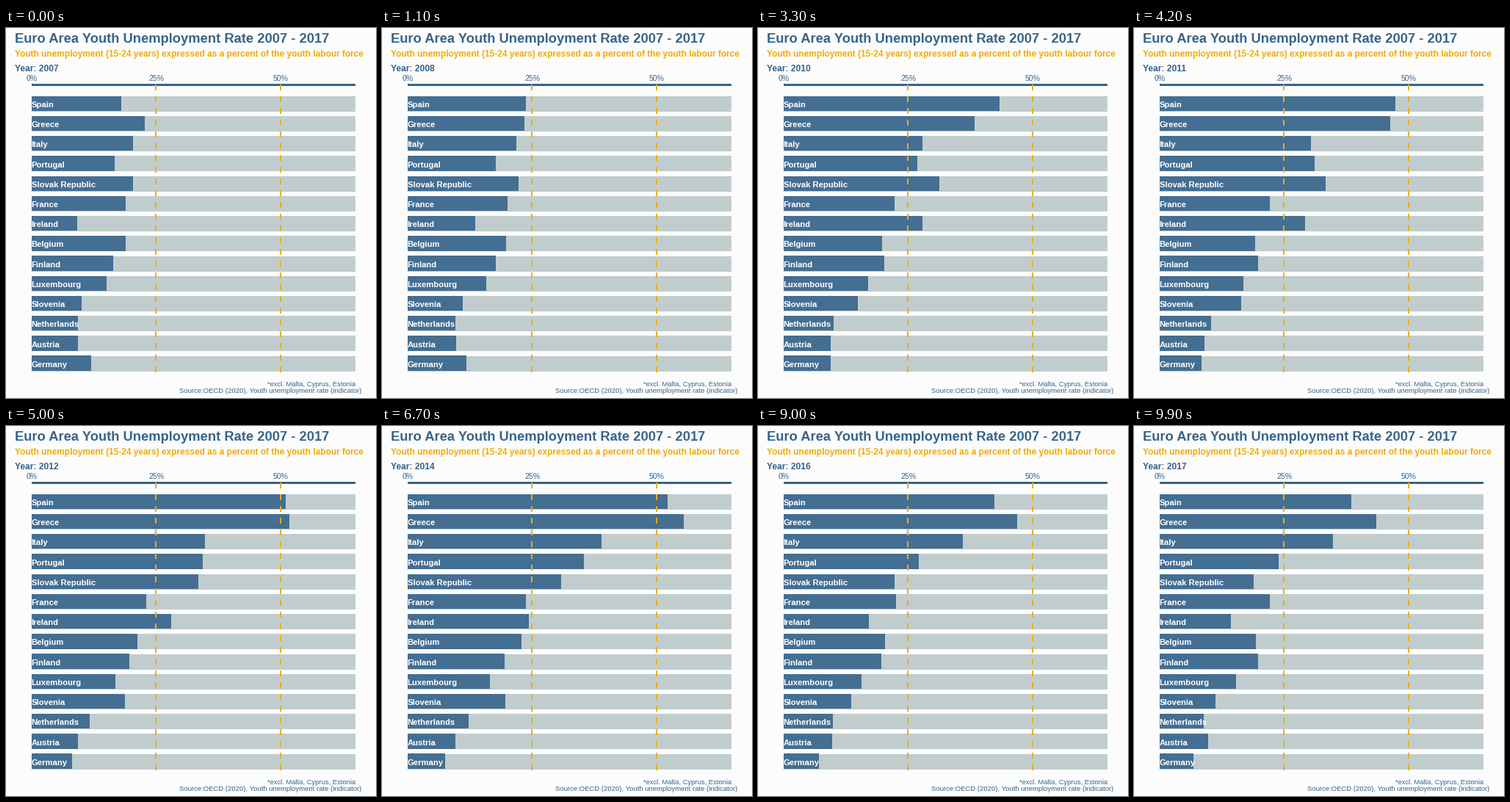
These frames come from a looping animation (504x504 px, 10 s). A matplotlib script:

```python
import matplotlib.pyplot as plt
import numpy as np
from matplotlib.animation import FuncAnimation
from matplotlib.patches import Rectangle

SIZE, DPI = 504, 100
FRAMES, INTERVAL = 100, 100
FIRST, LAST = 2007, 2017
NAVY, GOLD, TRACK, BAR = "#36648B", "#EEAD0E", "#C1CDCD", "#446E92"
LEFT, RIGHT, MAX_RATE = 35, 476, 65
TOP, PITCH, THICK = 93.2, 27.21, 20.35

# youth unemployment in 2007, 2009, 2011, 2013 and 2017
RATES = {
    "Spain": (18.1, 37.7, 46.2, 55.5, 38.6),
    "Greece": (22.7, 25.7, 44.7, 58.3, 43.6),
    "Italy": (20.4, 25.4, 29.2, 40, 34.8),
    "Portugal": (16.7, 20.4, 30.2, 38.1, 23.9),
    "Slovak Republic": (20.4, 27.2, 33.4, 33.7, 18.9),
    "France": (18.9, 23, 22, 24.1, 22.2),
    "Ireland": (9.2, 24.5, 29.6, 26.7, 14.4),
    "Belgium": (18.9, 21.9, 18.7, 23.7, 19.4),
    "Finland": (16.4, 21, 19.8, 19.5, 19.8),
    "Luxembourg": (15.1, 17.6, 16.8, 16.9, 15.4),
    "Slovenia": (10.1, 13.6, 15.7, 21.6, 11.3),
    "Netherlands": (9.4, 10.2, 10, 13.2, 8.9),
    "Austria": (9.4, 10.7, 8.9, 9.7, 9.8),
    "Germany": (12, 11.3, 8.5, 7.8, 6.9),
}

plt.rcParams["font.family"] = "Liberation Sans"

fig = plt.figure(figsize=(SIZE / DPI, SIZE / DPI), dpi=DPI, facecolor="#FCFCFC")
ax = fig.add_axes([0, 0, 1, 1])
ax.set_xlim(0, SIZE)
ax.set_ylim(SIZE, 0)
ax.axis("off")


def x_of(rate):
    return LEFT + rate * (RIGHT - LEFT) / MAX_RATE


def stage(year):
    """Position between the key years; the crisis starts slowly in 2008."""
    return np.interp(year, (2007, 2008, 2009, 2011, 2013, 2017),
                     (0, 0.2, 1, 2, 3, 4))


def label(x, y, text, px, color=NAVY, weight="normal", ha="left"):
    return ax.text(x, y, text, fontsize=px * 72 / DPI, color=color,
                   weight=weight, ha=ha, va="baseline", zorder=5)


def rect(x, y, w, h, color, z):
    return ax.add_patch(Rectangle((x, y), w, h, facecolor=color, linewidth=0,
                                  antialiased=False, zorder=z))


bars = []
for row, (name, rates) in enumerate(RATES.items()):
    y = TOP + PITCH * row
    top, bottom = int(y), int(y + THICK)
    rect(LEFT, int(y + 0.15), RIGHT - LEFT, 21, TRACK, 1)
    bars.append((rect(LEFT, top, 0, bottom - top, BAR, 2), rates))
    label(LEFT - 0.3, round(y + 14.8), name, 11.3, "white", "bold")

rect(LEFT, 76, RIGHT - LEFT, 3, NAVY, 3)
for rate in (0, 25, 50):
    x = x_of(rate)
    label(x, 72, f"{rate}%", 10.5, ha="center")
    if rate:
        for y in range(77, 469, 16):
            rect(int(x) - 1, y, 2, 8, GOLD, 4)

label(12, 20, "Euro Area Youth Unemployment Rate 2007 - 2017", 18.4, weight="bold")
label(12, 39, "Youth unemployment (15-24 years) expressed as a percent "
      "of the youth labour force", 11.9, GOLD, "bold")
year_text = label(12, 59, "", 12, weight="bold")
label(476, 488, "*excl. Malta, Cyprus, Estonia", 9.4, ha="right")
label(484, 497, "Source:OECD (2020), Youth unemployment rate (indicator)", 9.45, ha="right")


def draw(i):
    year = FIRST + (LAST - FIRST) * i / (FRAMES - 1)
    year_text.set_text(f"Year: {round(year)}")
    for bar, rates in bars:
        rate = np.interp(stage(year), range(len(rates)), rates)
        bar.set_width(int(x_of(rate)) - LEFT)
    return [year_text] + [bar for bar, _ in bars]


anim = FuncAnimation(fig, draw, frames=FRAMES, interval=INTERVAL,
                     repeat=True, repeat_delay=0)
plt.show()
```
